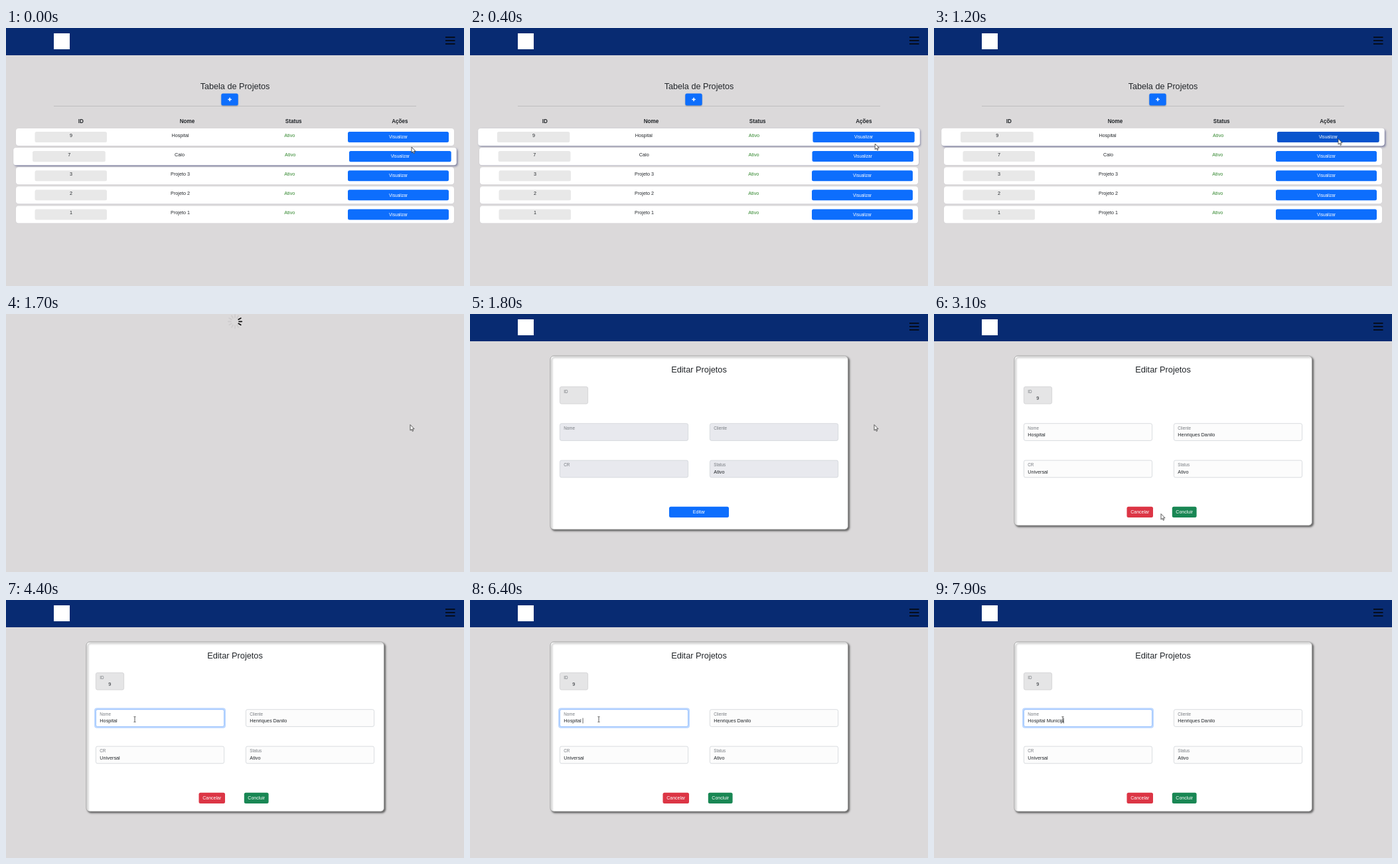
These frames come from a looping animation (690x388 px, 8000 ms). An HTML page with a canvas:

```html
<!DOCTYPE html>
<html lang="pt">
<head>
<meta charset="utf-8">
<title>Projetos</title>
<style>
  html, body { margin: 0; width: 100%; height: 100%; overflow: hidden; background: #dbd9da; }
  canvas { display: block; width: 690px; height: 388px; }
</style>
</head>
<body>
<canvas id="stage" width="690" height="388"></canvas>
<script>
const LOOP = 8000, STEP = 100;
const FONT = '"Liberation Sans", Arial, sans-serif';
const BLUE = '#0d6efd', INK = '#212529', PAGE = '#dbd9da';
const canvas = document.getElementById('stage');
const ctx = canvas.getContext('2d');

const clamp = v => Math.max(0, Math.min(1, v));
const lerp = (a, b, k) => a + (b - a) * k;
const ease = k => k * k * (3 - 2 * k);
const progress = (t, from, to) => ease(clamp((t - from) / (to - from)));

function mix(a, b, k) {
  return `rgb(${a.map((v, i) => Math.round(lerp(v, b[i], k))).join(',')})`;
}

function box(x, y, w, h, r, fill, stroke) {
  ctx.beginPath();
  ctx.roundRect(x, y, w, h, r);
  ctx.fillStyle = fill;
  ctx.fill();
  if (stroke) {
    ctx.strokeStyle = stroke;
    ctx.lineWidth = 0.8;
    ctx.stroke();
  }
}

function text(str, x, y, size, color = INK, align = 'left', weight = 400) {
  ctx.font = `${weight} ${size}px ${FONT}`;
  ctx.textAlign = align;
  ctx.fillStyle = color;
  ctx.fillText(str, x, y);
}

function withShadow(color, blur, dx, dy, draw) {
  ctx.save();
  ctx.shadowColor = color;
  ctx.shadowBlur = blur;
  ctx.shadowOffsetX = dx;
  ctx.shadowOffsetY = dy;
  draw();
  ctx.restore();
}

function button(label, x, y, w, h, fill, size = 7) {
  box(x, y, w, h, 2.5, fill);
  text(label, x + w / 2, y + h / 2 + size * 0.34, size, '#fff', 'center');
}

function header() {
  ctx.fillStyle = '#082b72';
  ctx.fillRect(0, 0, 690, 41);
  ctx.fillStyle = '#fff';
  ctx.fillRect(72, 8, 24, 24);
  ctx.fillStyle = '#05080f';
  for (const y of [13, 18, 23]) ctx.fillRect(662, y, 14.5, 1.7);
}

// Table page
const projects = [[9, 'Hospital'], [7, 'Calo'], [3, 'Projeto 3'], [2, 'Projeto 2'], [1, 'Projeto 1']];

function tableRow([id, name], index, hover, pressed) {
  const mid = 164 + index * 29.1;
  const scale = 1 + 0.0115 * hover;
  ctx.save();
  ctx.translate(345, mid);
  ctx.scale(scale, scale);
  ctx.translate(-345, 0);
  withShadow(`rgba(70,75,125,${0.12 + 0.5 * hover})`, 1 + 2 * hover, 1.8 * hover, 0.4 + 1.4 * hover,
    () => box(15, -13, 660, 26, 4, '#fff'));
  box(43.5, -8, 108.5, 16, 2.5, '#e8e8e8');
  text(id, 98, 0, 7.2, INK, 'center');
  text(name, 262.5, 0, 7.2, INK, 'center');
  text('Ativo', 427.3, 0, 7.3, '#33882f', 'center');
  button('Visualizar', 515, -8, 152, 16, mix([13, 110, 253], [8, 84, 205], pressed), 6.5);
  ctx.restore();
}

function tablePage(t) {
  header();
  text('Tabela de Projetos', 345, 91.5, 12.65, INK, 'center');
  ctx.fillStyle = '#bcbabb';
  ctx.fillRect(72, 117, 546, 0.9);
  withShadow('rgba(0,0,0,.25)', 2, 0, 1, () => box(324.3, 98.5, 25.4, 18, 2.5, BLUE));
  ctx.fillStyle = '#fff';
  ctx.fillRect(334.4, 106.7, 5.4, 1.5);
  ctx.fillRect(336.35, 104.75, 1.5, 5.4);
  ['ID', 'Nome', 'Status', 'Ações'].forEach((label, i) =>
    text(label, 112.8 + i * 160.2, 143, 8.15, INK, 'center', 700));
  const moved = progress(t, 200, 500);
  const pressed = progress(t, 400, 600);
  projects.forEach((p, i) => tableRow(p, i, [moved, 1 - moved][i] || 0, i ? 0 : pressed));
}

function loadingPage(t) {
  const lead = Math.round((t - 1700) / 100);
  ctx.save();
  ctx.translate(345, 11.3);
  ctx.lineCap = 'round';
  ctx.lineWidth = 1.7;
  for (let i = 0; i < 12; i++) {
    const lit = (i - lead + 13) % 12 < 3;
    const a = i * Math.PI / 6;
    ctx.strokeStyle = lit ? '#0b0b0b' : '#cecccd';
    ctx.beginPath();
    ctx.moveTo(6 * Math.cos(a), 6 * Math.sin(a));
    ctx.lineTo(10.2 * Math.cos(a), 10.2 * Math.sin(a));
    ctx.stroke();
  }
  ctx.restore();
}

// Form page
const keys = [[5400, ' '], [6600, 'M'], [6800, 'u'], [7100, 'n'], [7200, 'i'], [7600, 'c'], [7700, 'i'], [7900, 'p']];
const blinkOff = [[4400, 4900], [5900, 6400]];

function field(label, value, x, y, editing, focus = 0) {
  if (focus) box(x - 2, y - 2, 198, 30.5, 4, `rgba(13,110,253,${0.27 * focus})`);
  const border = mix([208, 211, 216], [134, 183, 254], focus);
  box(x + 0.4, y + 0.4, 193.2, 25.7, 2.5, editing ? (focus ? '#fff' : '#fcfcfc') : '#e8e9ee', border);
  text(label, x + 6.3, y + 9.6, 6.3, '#777b80');
  text(value, x + 6.3, y + 19.8, 7.3);
}

function formPage(t) {
  const editing = t >= 3100, loaded = t >= 1900;
  const focus = clamp((t - 3900) / 100);
  const show = s => loaded ? s : '';
  const typed = keys.filter(([at]) => t >= at).map(k => k[1]).join('');
  const name = 'Hospital' + typed;

  header();
  withShadow('rgba(60,60,60,.75)', 2.5, 2, 2, () =>
    box(121, 63, 448.5, editing ? 255 : 261, 5, '#fff', '#999'));
  text('Editar Projetos', 345, 87.5, 12.75, INK, 'center');

  box(135.4, 109.4, 42.2, 25.7, 2.5, '#e5e5e6', '#cfcfd1');
  text('ID', 141.3, 119, 6.3, '#777b80');
  text(show('9'), 156.3, 128.7, 7.3, INK, 'center');

  field('Nome', show(name), 135, 164.3, editing, focus);
  field('Cliente', show('Henriques Danilo'), 361, 164.3, editing);
  field('CR', show('Universal'), 135, 219.7, editing);
  field('Status', 'Ativo', 361, 219.7, editing);

  if (focus && !blinkOff.some(([a, b]) => t >= a && t < b)) {
    ctx.font = `400 7.3px ${FONT}`;
    ctx.fillStyle = INK;
    ctx.fillRect(141.3 + ctx.measureText(name).width, 177.5, 0.7, 8);
  }

  if (editing) {
    button('Cancelar', 290.5, 289.7, 39.5, 16.4, '#dc3545');
    button('Concluir', 358.8, 289.7, 36.8, 16.4, '#198754');
  } else {
    button('Editar', 300, 289.7, 90, 16.4, BLUE);
  }
}

// Pointer: time, x, y of each stop
const stops = [
  [0, 611, 179], [100, 611, 179], [800, 609, 166.5], [1800, 609, 166.5],
  [2300, 309, 234], [2900, 342, 300.5], [3100, 342, 300.5], [3900, 194, 179.5], [LOOP, 194, 179.5]
];

function pointerAt(t) {
  const i = stops.findIndex(s => t < s[0]);
  const [t0, x0, y0] = stops[i - 1], [t1, x1, y1] = stops[i];
  const k = progress(t, t0, t1);
  return [lerp(x0, x1, k), lerp(y0, y1, k)];
}

const arrow = new Path2D('M0 0V8.6L2 6.8L3.3 9.8L4.7 9.2L3.4 6.3H6.1Z');
const hand = new Path2D('M-1 .7Q0-.6 1 .7V4L4.8 4.8Q5.5 5 5.3 6L4.7 9.8H-.4L-3 6.4Q-3.4 5.4-2.2 5.5L-1 6.4Z');
const beam = new Path2D('M-1.5-4H-.4L0-3.6L.4-4H1.5M0-3.6V3.6M-1.5 4H-.4L0 3.6L.4 4H1.5');

function pointer(t) {
  const [x, y] = pointerAt(t);
  const onButton = (t >= 500 && t < 1200) || (t >= 1900 && t < 3100 && y > 290 && x < 390);
  const onField = t >= 3100 && y < 191 && x < 329;
  ctx.save();
  ctx.translate(x, y);
  ctx.lineWidth = 0.8;
  ctx.lineJoin = 'round';
  ctx.strokeStyle = '#303030';
  if (onField) {
    ctx.stroke(beam);
  } else {
    const shape = onButton ? hand : arrow;
    ctx.fillStyle = '#fff';
    ctx.fill(shape);
    ctx.stroke(shape);
  }
  ctx.restore();
}

function draw(t) {
  ctx.fillStyle = PAGE;
  ctx.fillRect(0, 0, 690, 388);
  if (t < 1500) tablePage(t);
  else if (t < 1800) loadingPage(t);
  else formPage(t);
  pointer(t);
}

let start;
function tick(now) {
  start ??= now;
  // The screen updates ten times a second.
  draw(Math.floor(((now - start) % LOOP) / STEP) * STEP);
  requestAnimationFrame(tick);
}
requestAnimationFrame(tick);
</script>
</body>
</html>
```
